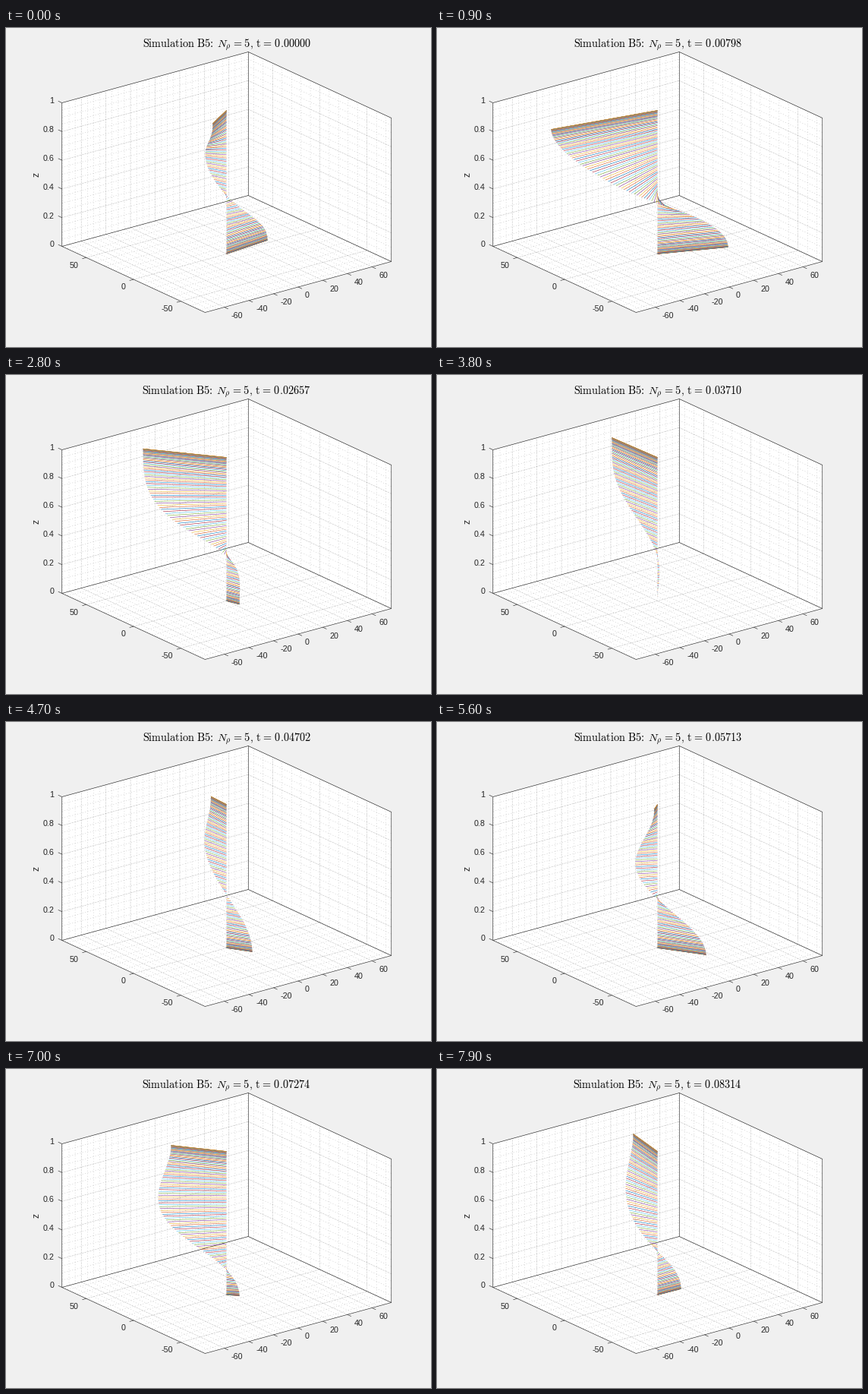
Recreate the animation shown at these times as a matplotlib script. Size 560x420 px, loop 8000 ms.

```python
import numpy as np
import matplotlib.pyplot as plt
from matplotlib.animation import FuncAnimation
from matplotlib.collections import LineCollection

FRAMES, STEP = 80, 100
PX = 0.72  # points per pixel at 100 dpi
LIMIT = 75.7
INK = "#262626"
COLORS = ["#0072BD", "#D95319", "#EDB120", "#7E2F8E", "#77AC30", "#4DBEEE", "#A2142F"]

plt.rcParams["font.family"] = "Liberation Sans"
plt.rcParams["mathtext.fontset"] = "cm"

# Screen vectors of the box: floor centre, half edges along x and y, full height.
CENTER = np.array([290.25, 297.0])
X_HALF = np.array([122.75, -33.5])
Y_HALF = np.array([-94.25, -43.5])
Z_EDGE = np.array([0.0, -189.0])

# Waypoints: ms, clock, then the flow (right + down j) at z = 0, 1/3, 2/3, 1.
WAYPOINTS = np.array([
    (0, 0, 54 - 18j, 12 - 3j, -28 - 3j, -18 + 17j),
    (900, 0.00798, 93 - 9j, 25 + 5j, -68 + 29j, -140 + 25j),
    (1900, 0.01752, 51 + 5j, 10 + 10j, -106 + 25j, -143 + 9j),
    (3800, 0.03710, 0, -2 - 2j, -49 - 19j, -60 - 26j),
    (5600, 0.05713, 64 + 9j, 6 + 4j, -27 + 2j, -4 + 6j),
    (7000, 0.07274, 17 + 1j, -34 + 3j, -90, -73 - 8j),
    (7900, 0.08314, 31 - 8j, -7 - 2j, -42 - 14j, -32 - 23j),
])
TIMES = WAYPOINTS[:, 0].real
SLOPES = np.gradient(WAYPOINTS, TIMES, axis=0)


def modes(z):
    """Cosine modes in depth, flat at both ends."""
    return np.cos(np.pi * np.outer(z, np.arange(4)))


# Chebyshev levels, dense at both ends
HEIGHTS = (1 - np.cos(np.linspace(0, np.pi, 129))) / 2
SHAPE = modes(HEIGHTS) @ np.linalg.inv(modes(np.linspace(0, 1, 4)))


def state(t):
    """Clock and tip offsets at time t, by cubic Hermite easing."""
    i = min(np.searchsorted(TIMES, t, side="right"), len(TIMES) - 1) - 1
    h = TIMES[i + 1] - TIMES[i]
    u = (t - TIMES[i]) / h
    row = ((1 + 2 * u) * (1 - u) ** 2 * WAYPOINTS[i] + u * (1 - u) ** 2 * h * SLOPES[i]
           + u * u * (3 - 2 * u) * WAYPOINTS[i + 1] + u * u * (u - 1) * h * SLOPES[i + 1])
    return row[1].real, SHAPE @ row[2:]


def project(x, y, z):
    return CENTER + x / LIMIT * X_HALF + y / LIMIT * Y_HALF + z * Z_EDGE


def add_lines(segments, **style):
    ax.add_collection(LineCollection(segments, **style))


def grid(xs, ys, zs):
    m = LIMIT
    lines = []
    for x in xs:
        lines += [[project(x, -m, 0), project(x, m, 0)], [project(x, m, 0), project(x, m, 1)]]
    for y in ys:
        lines += [[project(-m, y, 0), project(m, y, 0)], [project(m, y, 0), project(m, y, 1)]]
    for z in zs:
        lines += [[project(-m, m, z), project(m, m, z)], [project(m, m, z), project(m, -m, z)]]
    return lines


def draw_box():
    m = LIMIT
    a, b, c, d = [project(x, y, 0) for x, y in ((-m, -m), (m, -m), (m, m), (-m, m))]
    rim = [a, b, b + Z_EDGE, c + Z_EDGE, d + Z_EDGE, d]
    ax.fill(*np.transpose(rim), color="white", lw=0)

    xs, ys, zs = np.arange(-60, 61, 20), np.arange(-50, 51, 50), np.arange(0, 1.01, 0.2)
    minor = grid(np.arange(-75, 76, 5), np.arange(-70, 71, 10), np.arange(0.05, 1, 0.05))
    add_lines(minor, colors=INK, alpha=0.33, linewidths=0.5 * PX,
              linestyles=[(0, (2, 5))], snap=False)
    add_lines(grid(xs, ys, zs), colors=INK, alpha=0.13, linewidths=0.55 * PX, snap=False)

    edges = [rim + [a], [d, c, b], [c, c + Z_EDGE]]
    x_dir, y_dir = (v / np.hypot(*v) for v in (X_HALF, Y_HALF))

    def tick(p, direction, label, shift, ha):
        edges.append([p, p + 5.5 * direction])
        ax.text(*(p + shift), label, size=10.8 * PX, color=INK, ha=ha, va="center_baseline")

    for x in xs:
        tick(project(x, -m, 0), -y_dir, f"{x}", (9, 10.5), "left")
    for y in ys:
        tick(project(-m, y, 0), -x_dir, f"{y}", (-10.5, 9.5), "right")
    for z in zs:
        tick(project(-m, m, z), y_dir, f"{z:.1g}", (-10.5, -3), "right")
    add_lines(edges, colors=INK, linewidths=0.6 * PX)
    ax.text(40, 192.5, "z", size=12 * PX, color=INK, rotation=90, ha="center", va="center")


def caption(t):
    return (r"$\mathrm{Simulation\ B5\!:}\hspace{0.24}N_\rho\hspace{0.08}=\hspace{0.08}5"
            r"\mathrm{,\hspace{0.13}t\hspace{0.13}=\hspace{0.13}" + f"{t:.5f}" + "}$")


fig = plt.figure(figsize=(5.6, 4.2), dpi=100, facecolor="#f0f0f0")
ax = fig.add_axes([0, 0, 1, 1])
ax.set(xlim=(-0.5, 559.5), ylim=(419.5, -0.5))
ax.axis("off")
draw_box()

roots = np.array([290.0, 297.0]) + HEIGHTS[:, None] * Z_EDGE
arrows = LineCollection([], colors=COLORS, linewidths=0.55 * PX, zorder=5)
ax.add_collection(arrows)
title = ax.text(290, 24.5, caption(0), size=10.26, color="black", ha="center", va="baseline")


def update(n):
    clock, tips = state(n * STEP)
    ends = roots + np.column_stack([tips.real, tips.imag])
    arrows.set_segments(np.stack([roots, ends], axis=1))
    title.set_text(caption(clock))
    return arrows, title


anim = FuncAnimation(fig, update, frames=FRAMES, interval=STEP, repeat=True, repeat_delay=0)
plt.show()
```
